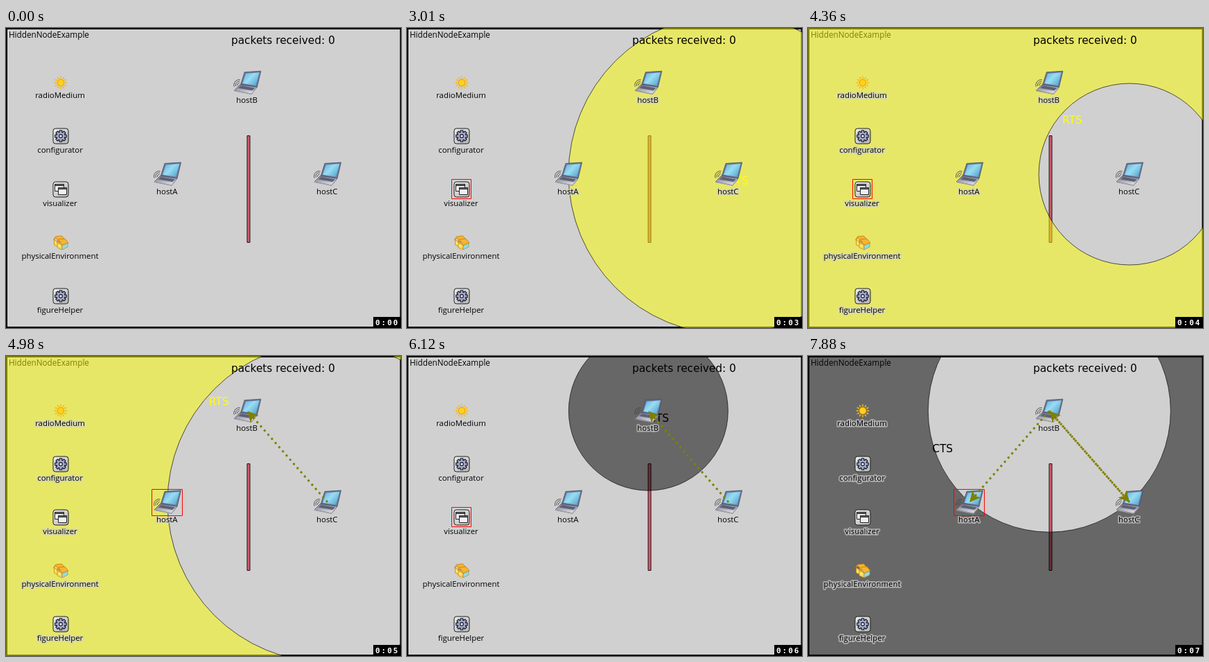
Animation, 570 px wide and 433 px high, one loop 8000 ms. Source, as an HTML page with a canvas:

```html
<!DOCTYPE html>
<html lang="en">
<head>
<meta charset="utf-8">
<title>Hidden node simulation</title>
<style>
html, body { margin: 0; width: 570px; height: 433px; overflow: hidden; background: #d0d0d0; }
canvas { display: block; }
</style>
</head>
<body>
<canvas id="stage" width="570" height="433"></canvas>
<script>
const ctx = document.getElementById('stage').getContext('2d');
const LOOP = 8000, FULL = 900;
const LABEL = '500 11.4px "Open Sans", sans-serif';
const TITLE = '500 11.7px "Open Sans", sans-serif';
const PLAIN = '15.33px "DejaVu Sans", sans-serif';
const hosts = { A: [233, 211], B: [348.3, 79.2], C: [464, 211] };
const signals = {
  RTS: { from: 'C', color: '#ff0', dir: [-.74, -.667], drop: 14.5 },
  CTS: { from: 'B', color: '#000', dir: [-.966, .251], drop: 16 }
};
// time, focused module, radius of the wave front, radius of the wave tail
const steps = [
  [0], [840, 'A'], [950, 'C'], [1150, 'A'], [1980, 'C'],
  [2190, 'V', 0, 0], [2390, 'V', 58, 0], [2600, 'V', 116, 0], [2800, 'B', 175, 0],
  [3010, 'V', 231, 0], [3210, 'V', FULL, 0], [3630, 'C', FULL, 0],
  [3840, 'V', FULL, 23], [4050, 'V', FULL, 66], [4150, 'V', FULL, 87],
  [4360, 'V', FULL, 131], [4570, 'B', FULL, 175], [4780, 'V', FULL, 203],
  [4980, 'A', FULL, 231], [5190, 'V'], [5400, 'B'],
  [5810, 'B', 0, 0], [6020, 'V', 58, 0], [6120, 'V', 115, 0], [6330, 'V', 175, 0],
  [6540, 'C', 175, 0], [6750, 'V', FULL, 0], [7160, 'B', FULL, 0],
  [7370, 'V', FULL, 58], [7470, 'V', FULL, 116], [7680, 'V', FULL, 175], [7880, 'A', FULL, 175]
];
const links = [[4780, 'C', 'B'], [7680, 'B', 'C'], [7880, 'B', 'A']];

function paint(fill, stroke, width = 1) {
  if (fill) { ctx.fillStyle = fill; ctx.fill(); }
  if (stroke) { ctx.strokeStyle = stroke; ctx.lineWidth = width; ctx.stroke(); }
}

function poly(points, fill, stroke, width) {
  ctx.beginPath();
  points.forEach(p => ctx.lineTo(...p));
  ctx.closePath();
  paint(fill, stroke, width);
}

function box(x, y, w, h, fill, stroke, radius = 0) {
  ctx.beginPath();
  ctx.roundRect(x, y, w, h, radius);
  paint(fill, stroke);
}

function disc(x, y, r, fill, stroke, width) {
  ctx.beginPath();
  ctx.arc(x, y, r, 0, 7);
  paint(fill, stroke, width);
}

function shade(x0, y0, x1, y1, ...colors) {
  const g = ctx.createLinearGradient(x0, y0, x1, y1);
  colors.forEach((c, i) => g.addColorStop(i / (colors.length - 1), c));
  return g;
}

function text(str, x, y, font, color = '#000', align = 'left') {
  ctx.font = font;
  ctx.textAlign = align;
  ctx.fillStyle = color;
  ctx.fillText(str, x, y);
}

function label(str, x, y) {
  ctx.font = LABEL;
  ctx.textAlign = 'center';
  ctx.lineJoin = 'round';
  ctx.lineWidth = 4;
  ctx.strokeStyle = 'rgba(208,208,208,.6)';
  ctx.strokeText(str, x, y);
  ctx.lineJoin = 'miter';
  text(str, x, y, LABEL, '#000', 'center');
}

function at(x, y, draw) {
  ctx.save();
  ctx.translate(x, y);
  draw();
  ctx.restore();
}

function around(count, draw) {
  for (let i = 0; i < count; i++) {
    ctx.save();
    ctx.rotate(i * 2 * Math.PI / count);
    draw();
    ctx.restore();
  }
}

function sun() {
  around(12, () => poly([[-1.3, -6.5], [0, -10.5], [1.3, -6.5]], '#fcb80c'));
  disc(0, 0, 4.8, '#ffd21c', '#f0a400', 1.2);
}

function tile() {
  box(-11, -11, 22, 22, shade(-11, -11, 11, 11, '#eee', '#b4b4b4'), '#1c1c1c', 3.5);
}

function gear() {
  const dark = '#12162a', light = '#a4a8c6';
  tile();
  around(8, () => box(-2.4, -8.8, 4.8, 5, dark, null, 1));
  disc(0, 0, 6.8, dark);
  around(8, () => box(-1.2, -7.7, 2.4, 4, light));
  disc(0, 0, 5.5, light);
  disc(0, 0, 2.3, '#eee', dark, 1.2);
}

function windows() {
  tile();
  [[-8.5, -7.5, 13, 10], [-3.5, -2.5, 12, 10]].forEach(([x, y, w, h]) => {
    box(x, y, w, h, '#f0f0f0', '#222');
    box(x, y, w, 2, '#70707a', '#222');
  });
}

function house(x, y) {
  at(x, y, () => {
    poly([[-7, -1], [0, 2], [0, 9], [-7, 6]], '#ffd84e', '#c08410', .7);
    poly([[0, 2], [8, -1], [8, 5], [0, 9]], '#8edce6', '#b08a30', .7);
    poly([[-8, -1], [-5, -6], [4, -7], [9, -1], [0, 2.5], [-4, -4]], '#f8b430', '#b87408', .7);
    box(-5, 2, 2, 2.5, '#fff0b0');
  });
}

function houses() {
  house(-2.5, -3);
  house(2, 1);
}

function laptop() {
  [2.5, 5, 7.5].forEach(r => {
    ctx.beginPath();
    ctx.arc(-12, 3, r, 2.8, 4.9);
    paint(null, '#444', .9);
  });
  poly([[-10, 2], [14, 6], [6, 16], [-19, 11]], shade(-8, 2, -6, 16, '#707485', '#dcdce2'), '#5a5c68', .8);
  poly([[-9, 4], [11, 7.5], [7, 11], [-13, 7.5]], '#5c6176');
  poly([[-19, 11], [6, 15.5], [14, 6], [14, 7.5], [6, 17], [-19, 12]], '#a4a4ae');
  poly([[-4, -15.5], [19.5, -17], [14, 6], [-9.5, 2]], '#6c7798', '#444c68', .8);
  poly([[-2.3, -13.5], [17.3, -15], [12.3, 3.8], [-7, .7]], shade(-7, -14, 12, 4, '#58b2dc', '#9adcf2', '#56abd4'));
}

function wave(name, front, tail) {
  const { from, color, dir, drop } = signals[name];
  const [x, y] = hosts[from];
  ctx.beginPath();
  ctx.arc(x, y, front, 0, 2 * Math.PI);
  ctx.closePath();
  if (tail) {
    ctx.moveTo(x + tail, y);
    ctx.arc(x, y, tail, 0, 2 * Math.PI);
  }
  ctx.globalAlpha = .5;
  ctx.fillStyle = color;
  ctx.fill('evenodd');
  ctx.globalAlpha = 1;
  paint(null, 'rgba(0,0,0,.65)');
  text(name, x + tail * dir[0], y + drop + tail * dir[1], PLAIN, color);
}

function arrow(from, to) {
  const [x0, y0] = hosts[from], [x1, y1] = hosts[to];
  const length = Math.hypot(x1 - x0, y1 - y0);
  ctx.save();
  ctx.translate(x0, y0);
  ctx.rotate(Math.atan2(y1 - y0, x1 - x0));
  ctx.beginPath();
  ctx.moveTo(0, 0);
  ctx.lineTo(length - 12, 0);
  ctx.setLineDash([3, 5]);
  paint(null, '#808000', 3);
  ctx.setLineDash([]);
  poly([[length, 0], [length - 16, -8], [length - 12, 0], [length - 16, 8]], '#808000');
  ctx.restore();
}

function focus(name) {
  if (name === 'V') box(64.5, 218.5, 28, 28, null, '#f00');
  else if (name) {
    const [x, y] = hosts[name].map(Math.round);
    box(x - 22.5, y - 18.5, 44, 38, null, '#f00');
  }
}

const modules = [
  ['radioMedium', sun, 101], ['configurator', gear, 180], ['visualizer', windows, 257],
  ['physicalEnvironment', houses, 333], ['figureHelper', gear, 411]
];

function draw(time) {
  const [start, focused, front, tail] = steps.filter(s => s[0] <= time).pop();
  ctx.fillStyle = '#d0d0d0';
  ctx.fillRect(0, 0, 570, 433);
  ctx.beginPath();
  ctx.rect(1, 1, 568.5, 431);
  paint(null, '#000', 2);
  text('HiddenNodeExample', 4, 14, TITLE);
  box(348, 155.5, 4, 154, '#cc5c6c', '#221014');

  if (front !== undefined) wave(start < 5500 ? 'RTS' : 'CTS', front, tail);

  modules.forEach(([name, icon, baseline], i) => {
    at(79, 79 + 77 * i, icon);
    label(name, 78, baseline);
  });
  for (const [name, [x, y]] of Object.entries(hosts)) {
    at(x, y, laptop);
    label('host' + name, x - .7, y + 29);
  }
  links.forEach(([since, from, to]) => { if (start >= since) arrow(from, to); });
  focus(focused);
  text('packets received: 0', 325, 23, PLAIN);

  ctx.fillStyle = '#000';
  ctx.fillRect(530, 417, 40, 16);
  ctx.letterSpacing = '2px';
  text('0:0' + Math.floor((start + 50) / 1000), 533, 428.5, 'bold 11px "DejaVu Sans Mono", monospace', '#fff');
  ctx.letterSpacing = '0px';
}

function tick() {
  draw(performance.now() % LOOP);
  requestAnimationFrame(tick);
}
tick();
</script>
</body>
</html>
```
